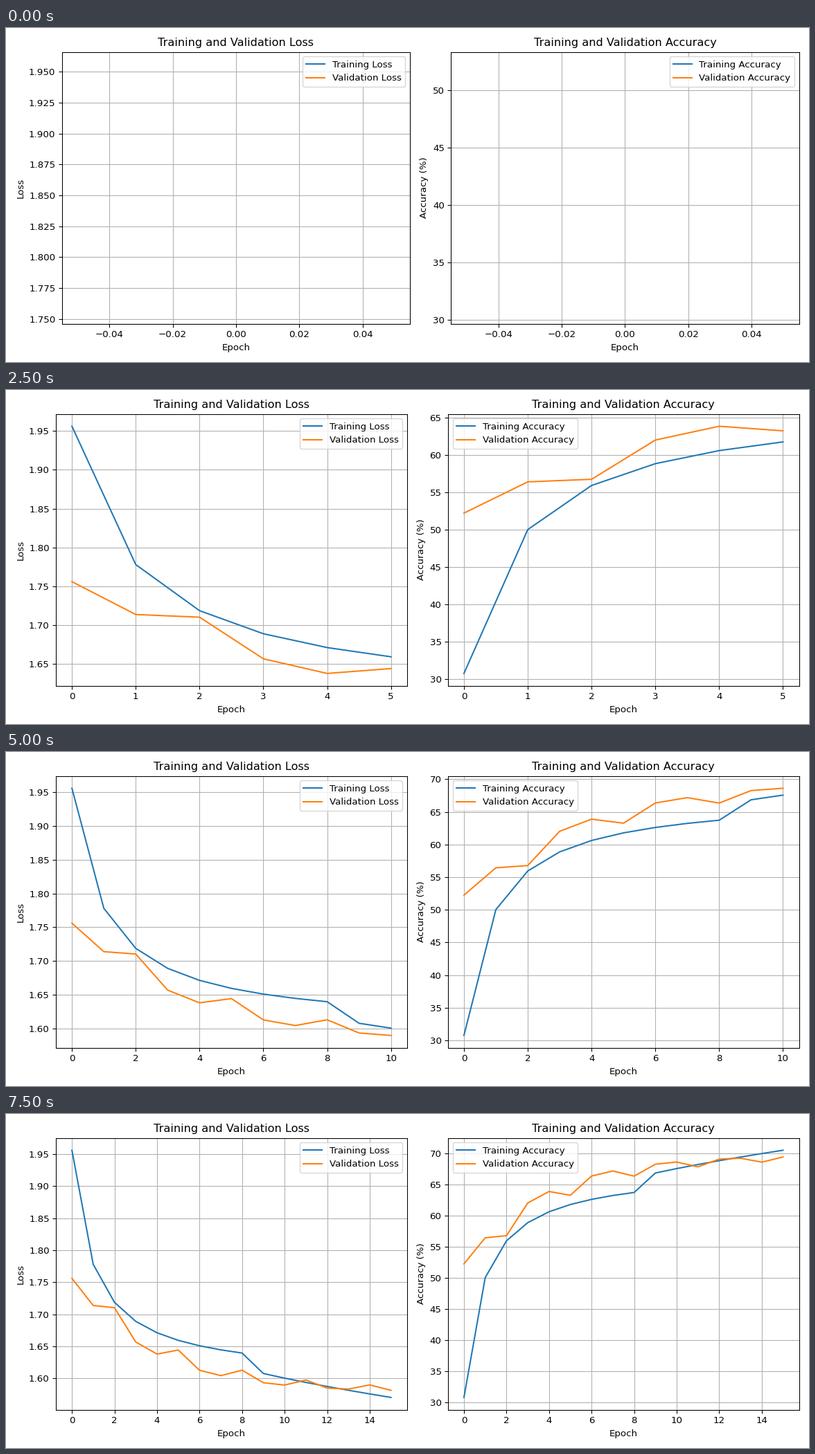
Write a matplotlib script that moves like this. It is 1159 by 483 pixels and loops after 8000 ms.

```python
import numpy as np
import matplotlib.pyplot as plt
from matplotlib.animation import FuncAnimation

EPOCHS = 16
epochs = np.arange(EPOCHS)


def training_loss(e):
    """Hyperbolic decay, with an extra drop once the rate changes after epoch 8."""
    drop = np.where(e > 8, 0.028 + 0.004 * (e - 9), 0)
    return 1.6 + 0.356 / (1 + e) - drop


def validation_loss(e):
    """Exponential decay with a fading three-epoch wobble."""
    wobble = 0.024 * np.exp(-e / 9) * np.cos(2 * np.pi * (e - 2) / 3)
    return 1.58 + 0.188 * np.exp(-e / 3.8) + wobble


def accuracy(loss):
    x = loss - 1.6
    return 67.6 - 98 * x - 122 * x ** 4


losses = {"Training": training_loss(epochs), "Validation": validation_loss(epochs)}
accuracies = {split: accuracy(loss) for split, loss in losses.items()}

fig, (loss_ax, acc_ax) = plt.subplots(1, 2, figsize=(11.998, 5), dpi=96.6)


def draw_curves(ax, curves, name, unit, epoch):
    ax.clear()
    for split, values in curves.items():
        ax.plot(epochs[:epoch + 1], values[:epoch + 1], label=f"{split} {name}")
    ax.set_title(f"Training and Validation {name}")
    ax.set_xlabel("Epoch")
    ax.set_ylabel(name + unit)
    ax.legend()
    ax.grid(True)


def update(epoch):
    draw_curves(loss_ax, losses, "Loss", "", epoch)
    draw_curves(acc_ax, accuracies, "Accuracy", " (%)", epoch)
    fig.tight_layout()


anim = FuncAnimation(fig, update, frames=EPOCHS, interval=500,
                     repeat=True, repeat_delay=0)
plt.show()
```
